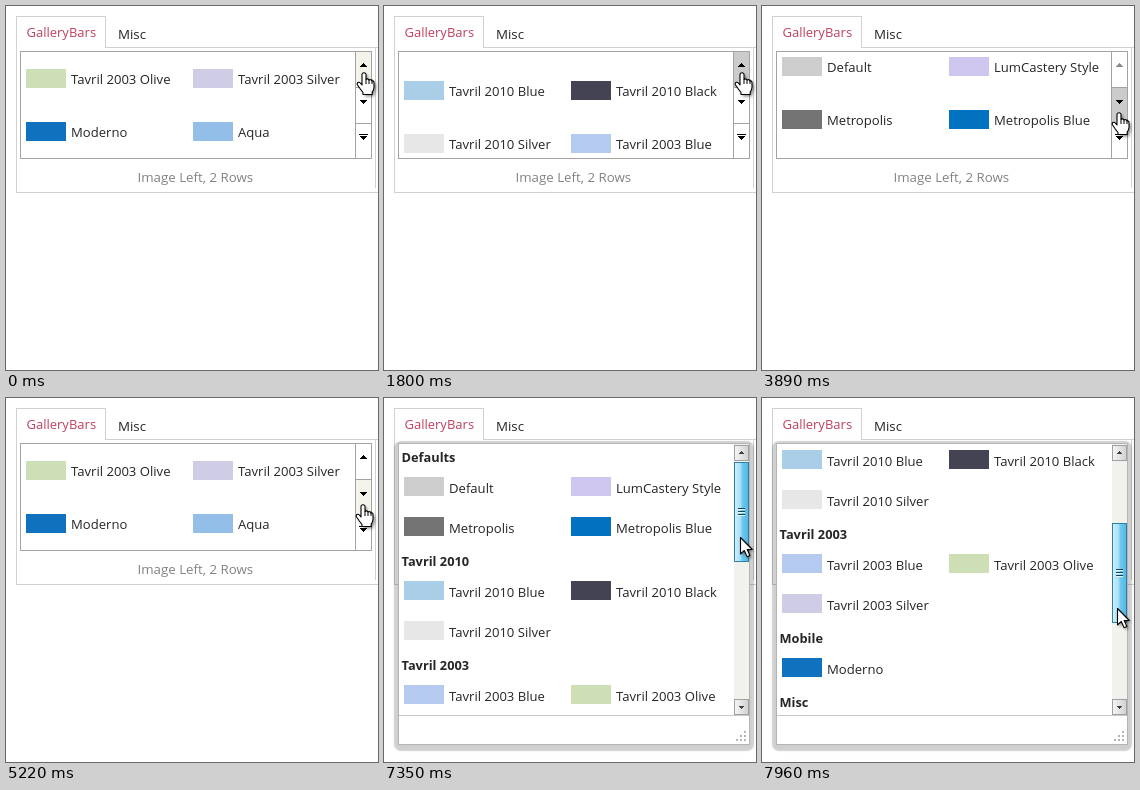
Animation of 372 by 364 pixels, one loop 7990 ms. Source, as an HTML page with a canvas:

```html
<!DOCTYPE html>
<html lang="en">
<head>
<meta charset="utf-8">
<title>Gallery bars</title>
<style>
  html, body { margin: 0; width: 100%; height: 100%; overflow: hidden; background: #fff; }
  canvas { display: block; }
</style>
</head>
<body>
<canvas id="stage" width="372" height="364"></canvas>
<script>
const ctx = document.getElementById('stage').getContext('2d');
const LOOP = 7990;
const FONT = '"Open Sans", "Noto Sans", sans-serif';
const LINE = '#d1d1d1', FRAME = '#a3a3a3', INK = '#262626', HOVER = '#f6f4ea', PRESSED = '#cbcbcb';

const groups = [
  ['Defaults', [['Default', '#cdcdcd'], ['LumCastery Style', '#cfc6ef'],
    ['Metropolis', '#737373'], ['Metropolis Blue', '#0072c0']]],
  ['Tavril 2010', [['Tavril 2010 Blue', '#abcee8'], ['Tavril 2010 Black', '#444354'],
    ['Tavril 2010 Silver', '#e7e7e7']]],
  ['Tavril 2003', [['Tavril 2003 Blue', '#b4cbef'], ['Tavril 2003 Olive', '#cfdfb5'],
    ['Tavril 2003 Silver', '#cfcde6']]],
  ['Mobile', [['Moderno', '#1072bf']]],
  ['Misc', [['Aqua', '#93bee8']]]
];
const items = groups.flatMap(g => g[1]);

const clamp = v => Math.max(0, Math.min(1, v));
const swing = p => 0.5 - Math.cos(Math.PI * p) / 2;
const mix = (a, b, p) => a + (b - a) * p;

// Progress from a to b, held for each step of the given length.
function stepped(t, a, b, step) {
  return clamp(Math.floor((t - a) / step) * step / (b - a));
}

function rect(x, y, w, h, color) {
  ctx.fillStyle = color;
  ctx.fillRect(x, y, w, h);
}

function box(x, y, w, h, color) {
  ctx.strokeStyle = color;
  ctx.lineWidth = 1;
  ctx.strokeRect(x + 0.5, y + 0.5, w - 1, h - 1);
}

function text(str, x, y, color = INK, size = 13.1, weight = 400) {
  ctx.font = `${weight} ${size}px ${FONT}`;
  ctx.fillStyle = color;
  ctx.fillText(str, x, y);
}

function clipped(x, y, w, h, draw) {
  ctx.save();
  ctx.beginPath();
  ctx.rect(x, y, w, h);
  ctx.clip();
  draw();
  ctx.restore();
}

function triangle(x, y, dir, color = '#000', rows = 4) {
  for (let i = 0; i < rows; i++) rect(x - i, y + i * dir, 1 + 2 * i, 1, color);
}

function item([label, color], col, y, rise = 10) {
  const x = 20 + col * 167;
  rect(x, y - rise, 40, 19, color);
  text(label, x + 45, y + 5);
}

// Each entry: start, end, first row before, first row after.
const pages = [[1090, 1240, 4, 2], [1800, 1920, 2, 0], [3890, 4040, 0, 2], [4540, 4660, 2, 4]];
function firstRow(t) {
  let row = 4;
  for (const [a, b, from, to] of pages) {
    if (t >= a) row = mix(from, to, swing(0.22 + 0.78 * stepped(t, a, b, 30)));
  }
  return row;
}

const dragAt = t => stepped(t, 7490, 7960, 10);

function pointer(t) {
  if (t < 2620) return { x: 358, y: 66, hand: t < 1920 };
  if (t < 5220) {
    const p = swing(stepped(t, 2620, 3190, 35));
    const y = mix(66, 106, p);
    return { x: mix(358, 357, p) - 5 * Math.sin(Math.PI * p), y, hand: y > 81 };
  }
  if (t < 6420) {
    const p = swing(stepped(t, 5220, 5580, 30));
    return { x: 357 + 3 * Math.sin(Math.PI * p), y: mix(106, 140, p), hand: true };
  }
  const p = dragAt(t);
  return { x: 356 - Math.round(p * p), y: mix(139, 210, p), hand: false };
}

function buttonColor(n, t, cur) {
  const pressed = pages.some(([a, b, from, to]) => t >= a && t < b && n === (to < from ? 0 : 1));
  if (pressed || (n === 2 && t >= 6140)) return PRESSED;
  const over = cur.y < 82 ? 0 : cur.y < 118 ? 1 : 2;
  return over === n && cur.hand ? HOVER : '#fff';
}

function panel(t, cur) {
  rect(100, 41, 272, 1, LINE);
  rect(10, 10, 1, 177, LINE);
  rect(10, 10, 90, 1, LINE);
  rect(99, 10, 1, 32, LINE);
  rect(10, 186, 362, 1, LINE);
  rect(369, 42, 1, 140, LINE);
  text('GalleryBars', 20.5, 31, '#c0405f', 13);
  text('Misc', 112, 33, INK, 13.3);
  text('Image Left, 2 Rows', 131.5, 176, '#828282', 13.3);

  const row = firstRow(t);
  clipped(15, 46, 334, 106, () => {
    items.forEach((it, i) => item(it, i % 2, Math.round(73 + ((i >> 1) - row) * 53)));
  });
  box(14, 45, 352, 108, FRAME);
  rect(349, 46, 1, 106, FRAME);
  [[46, 35], [82, 35], [118, 34]].forEach(([y, h], n) => {
    rect(350, y, 15, h, buttonColor(n, t, cur));
    if (n) rect(350, y - 1, 15, 1, FRAME);
  });
  triangle(357, 57, 1, row < 0.5 ? '#8c8c8c' : '#000');
  triangle(357, 97, -1);
  rect(353, 128, 9, 1, '#000');
  triangle(357, 133, -1);
}

function scrollButton(y, dir) {
  const g = ctx.createLinearGradient(350, 0, 365, 0);
  g.addColorStop(0, '#f6f6f6');
  g.addColorStop(0.5, '#e4e4e4');
  g.addColorStop(1, '#cfcfcf');
  rect(350, y, 15, 16, g);
  box(350, y, 15, 16, '#a0a0a0');
  triangle(357, dir > 0 ? y + 6 : y + 9, dir, '#404040', 3);
}

function scrollbar(y, hot) {
  rect(350, 46, 15, 271, '#f2f2ec');
  scrollButton(47, 1);
  scrollButton(301, -1);
  const g = ctx.createLinearGradient(350, 0, 365, 0);
  const stops = hot ? ['#d4f1fc', '#a5def6', '#6fc9ef', '#4fb5e3'] : ['#f6f6f6', '#e9e9e9', '#d6d6d6', '#c4c4c4'];
  stops.forEach((c, i) => g.addColorStop([0, 0.45, 0.55, 1][i], c));
  rect(350, y, 15, 100, g);
  box(350, y, 15, 100, hot ? '#2f7fa8' : '#979797');
  for (let i = 0; i < 3; i++) {
    rect(354, y + 46 + i * 3, 7, 1, hot ? '#17445c' : '#606060');
    rect(354, y + 47 + i * 3, 7, 1, '#e6f6fd');
  }
}

function popupShadow(height) {
  ctx.save();
  ctx.shadowColor = 'rgba(0,0,0,0.5)';
  ctx.shadowBlur = 3;
  ctx.fillStyle = 'rgba(0,0,0,0.13)';
  ctx.beginPath();
  ctx.roundRect(10, 43, 360, height + 8, 7);
  ctx.fill();
  ctx.restore();
}

function popup(t) {
  if (t < 6140) return;
  const open = swing(0.12 + 0.88 * stepped(t, 6140, 6420, 40));
  const height = Math.round(302 * open);
  const drag = dragAt(t);
  const thumb = Math.round(61 * drag);
  const scroll = Math.round(131 * drag);

  popupShadow(height);
  clipped(14, 45, 352, height, () => {
    ctx.translate(0, height - 302);
    rect(14, 45, 352, 302, '#fff');
    clipped(15, 46, 334, 271, () => {
      let y = 59 - scroll;
      for (const [title, list] of groups) {
        text(title, 17.5, y + 5, INK, 12.8, 700);
        list.forEach((it, i) => item(it, i % 2, y + 31 + 40 * (i >> 1), 11));
        y += 64 + 40 * (Math.ceil(list.length / 2) - 1);
      }
    });
    scrollbar(64 + thumb, t >= 7350);
    rect(15, 317, 350, 1, '#c9c9c9');
    for (let r = 0; r < 3; r++) {
      for (let c = 2 - r; c < 3; c++) rect(352 + c * 4, 333 + r * 4, 2, 2, '#b5b5b5');
    }
    box(14, 45, 352, 302, '#b4b4b4');
  });
}

const arrowPath = new Path2D('M0 0V16.5L3.8 13L6.6 19.2L9.4 18L6.7 12H11.8Z');
const handPath = new Path2D('M-2 1.5Q0-1 2 1.5V7Q4 5.5 5 7.5Q7 6.5 8 8.5Q10 8 10 10.5V15Q9.6 18 8.2 19.5V22H-1V20Q-2.5 18-4 16L-6.8 12Q-7 9-4.2 10L-2 12.5Z');

function cursor({ x, y, hand }) {
  const path = hand ? handPath : arrowPath;
  ctx.save();
  ctx.translate(Math.round(x) + (hand ? 0 : 0.5), Math.round(y) + 0.5);
  ctx.shadowColor = 'rgba(0,0,0,0.45)';
  ctx.shadowBlur = 3;
  ctx.shadowOffsetX = ctx.shadowOffsetY = 2;
  ctx.fillStyle = '#fff';
  ctx.fill(path);
  ctx.shadowColor = 'transparent';
  ctx.strokeStyle = '#000';
  ctx.lineWidth = 1.1;
  ctx.lineJoin = 'round';
  ctx.stroke(path);
  if (hand) [2, 5, 8].forEach(fx => rect(fx - 0.5, 7, 1, 4.5, '#000'));
  ctx.restore();
}

function draw(t) {
  rect(0, 0, 372, 364, '#fff');
  const cur = pointer(t);
  panel(t, cur);
  popup(t);
  cursor(cur);
}

const start = performance.now();
function tick() {
  draw((performance.now() - start) % LOOP);
  requestAnimationFrame(tick);
}
tick();
</script>
</body>
</html>
```
